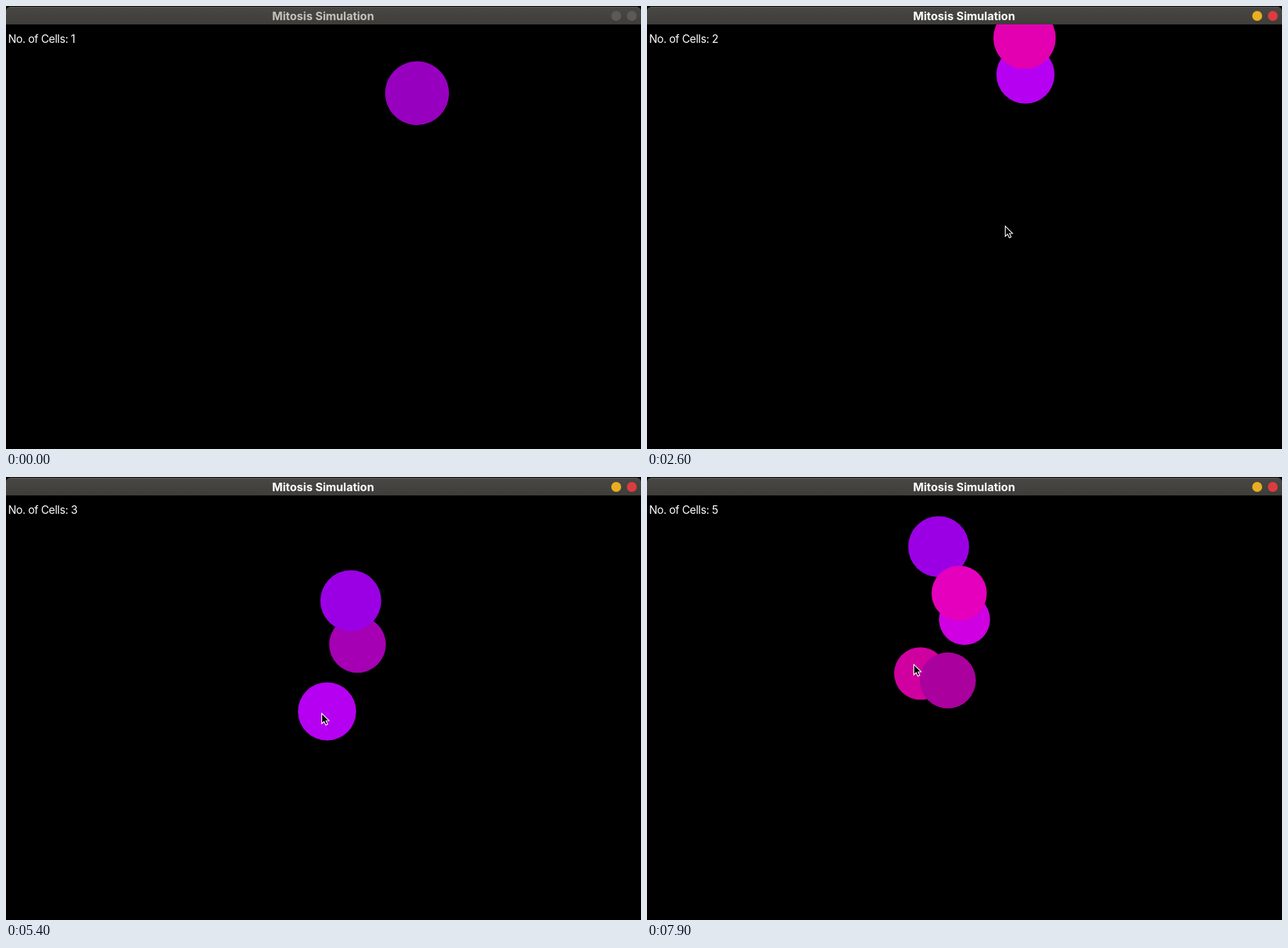
Write an HTML page with a canvas that moves like this. It is 896 px wide and 625 px high and loops after 8000 ms.

```html
<!DOCTYPE html>
<html lang="en">
<head>
<meta charset="utf-8">
<title>Mitosis Simulation</title>
<style>
  html, body { margin: 0; width: 100%; height: 100%; overflow: hidden; background: #000; }
  canvas { display: block; }
</style>
</head>
<body>
<canvas id="stage" width="896" height="625"></canvas>
<script>
const ctx = document.getElementById('stage').getContext('2d');
const WIDTH = 896, HEIGHT = 625, BAR = 26;
const STEP = 100, STEPS = 80;
const SPLITS = [13, 42, 55, 71];
const EXIT_Y = 20;

// Steps during which the cells stand still.
const isStalled = n => (n > 14 && n < 19) || n === 21 || n === 22 || n === 25 || n === 50;

// A cell drifts up and left by [dx, dy] per step and is at (x, y) at step "at".
// On leaving the top it re-enters lower by "hop".
const cell = (r, color, born, dies, at, x, y, drift = [3, 3], hop = 0) =>
  ({ r, color, born, dies, at, x, y, drift, hop });

const [split1, split2, split3, split4] = SPLITS;
const cells = [
  cell(45, '#9800c0', 0, split1, 0, 580, 123, [4, 4]),
  cell(41, '#b600f2', split1, split3, 14, 549, 112.5, [3, 3.15], 319),
  cell(44, '#e200b0', split1, split2, 14, 546, 61, [2.65, 3.2], 212),
  cell(40, '#a500b4', split2, split4, 45, 522, 261.5, [3.25, 3.15]),
  cell(43, '#9b00e4', split2, STEPS, 45, 510.5, 199, [3, 3.05]),
  cell(37, '#d000a0', split3, STEPS, 64, 439, 324.5, [3.55, 3.15]),
  cell(39.5, '#a9009e', split3, STEPS, 64, 466.5, 324.5, [2.8, 2.5]),
  cell(36, '#cf00e2', split4, STEPS, 79, 448, 201),
  cell(39, '#e400bc', split4, STEPS, 79, 440.5, 164)
];

// Where the pointer rests or turns: [step, x, y].
const turns = [[6, 316, 50], [13, 555, 100], [14, 555, 100], [24, 505, 310], [35, 505, 310],
  [42, 497, 215], [45, 456, 288], [48, 305, 400], [50, 345, 460], [54, 445, 333],
  [61, 400, 385], [64, 251, 251], [71, 443, 190], [79, 376, 264]];

function movedSteps(n) {
  let moved = 0;
  for (let i = 1; i <= n; i++) if (!isStalled(i)) moved++;
  return moved;
}

function cellPosition(c, n) {
  const moved = movedSteps(n) - movedSteps(c.at);
  const y = c.y - c.drift[1] * moved;
  return [c.x - c.drift[0] * moved, y < EXIT_Y ? y + c.hop : y];
}

function pointerPosition(n) {
  const next = Math.max(1, turns.findIndex(([step]) => step >= n));
  const [n0, x0, y0] = turns[next - 1], [n1, x1, y1] = turns[next];
  const k = (n - n0) / (n1 - n0), eased = k * k * (3 - 2 * k);
  return [x0 + (x1 - x0) * eased, y0 + (y1 - y0) * eased].map(Math.round);
}

function disc(x, y, r, color) {
  ctx.fillStyle = color;
  ctx.beginPath();
  ctx.arc(x, y, r, 0, Math.PI * 2);
  ctx.fill();
}

function label(text, x, y, font, color, align, spacing = '0px') {
  ctx.font = font;
  ctx.letterSpacing = spacing;
  ctx.fillStyle = color;
  ctx.textAlign = align;
  ctx.fillText(text, x, y);
}

function drawBar(focused) {
  const shade = ctx.createLinearGradient(0, 1, 0, BAR);
  shade.addColorStop(0, '#494844');
  shade.addColorStop(1, '#3e3d39');
  ctx.fillStyle = '#000';
  ctx.fillRect(0, 0, WIDTH, BAR);
  ctx.beginPath();
  ctx.roundRect(0, 1, WIDTH, BAR - 1, [6, 6, 0, 0]);
  ctx.fillStyle = shade;
  ctx.fill();
  ctx.fillStyle = '#5b5a55';
  ctx.fillRect(5, 1, WIDTH - 10, 1);
  label('Mitosis Simulation', 447.5, 20, '700 16px Inter, sans-serif', focused ? '#fff' : '#c3c1bc', 'center');
  disc(861, 14, 7, focused ? '#e9ae20' : '#5b5a56');
  disc(883, 14, 7, focused ? '#dc3c40' : '#5b5a56');
}

function drawPointer(x, y) {
  ctx.save();
  ctx.translate(x + 0.5, y + 0.5);
  ctx.fillStyle = '#000';
  ctx.strokeStyle = '#fff';
  ctx.lineWidth = 1.1;
  const arrow = new Path2D('M0 0V14.5L3.3 11.5L5.8 16.5L8.3 15.3L6 10.5L10.3 10.3Z');
  ctx.fill(arrow);
  ctx.stroke(arrow);
  ctx.restore();
}

function draw(n) {
  ctx.fillStyle = '#000';
  ctx.fillRect(0, 0, WIDTH, HEIGHT);
  const alive = cells.filter(c => c.born <= n && n < c.dies);
  for (const c of alive) disc(...cellPosition(c, n), c.r, c.color);
  label('No. of Cells: ' + alive.length, 3, 52, '15.5px Inter, sans-serif', '#fff', 'left', '-0.4px');
  drawBar(n >= split1);
  if (n >= turns[0][0]) drawPointer(...pointerPosition(n));
}

function tick() {
  draw(Math.floor(performance.now() / STEP) % STEPS);
  requestAnimationFrame(tick);
}
tick();
</script>
</body>
</html>
```
